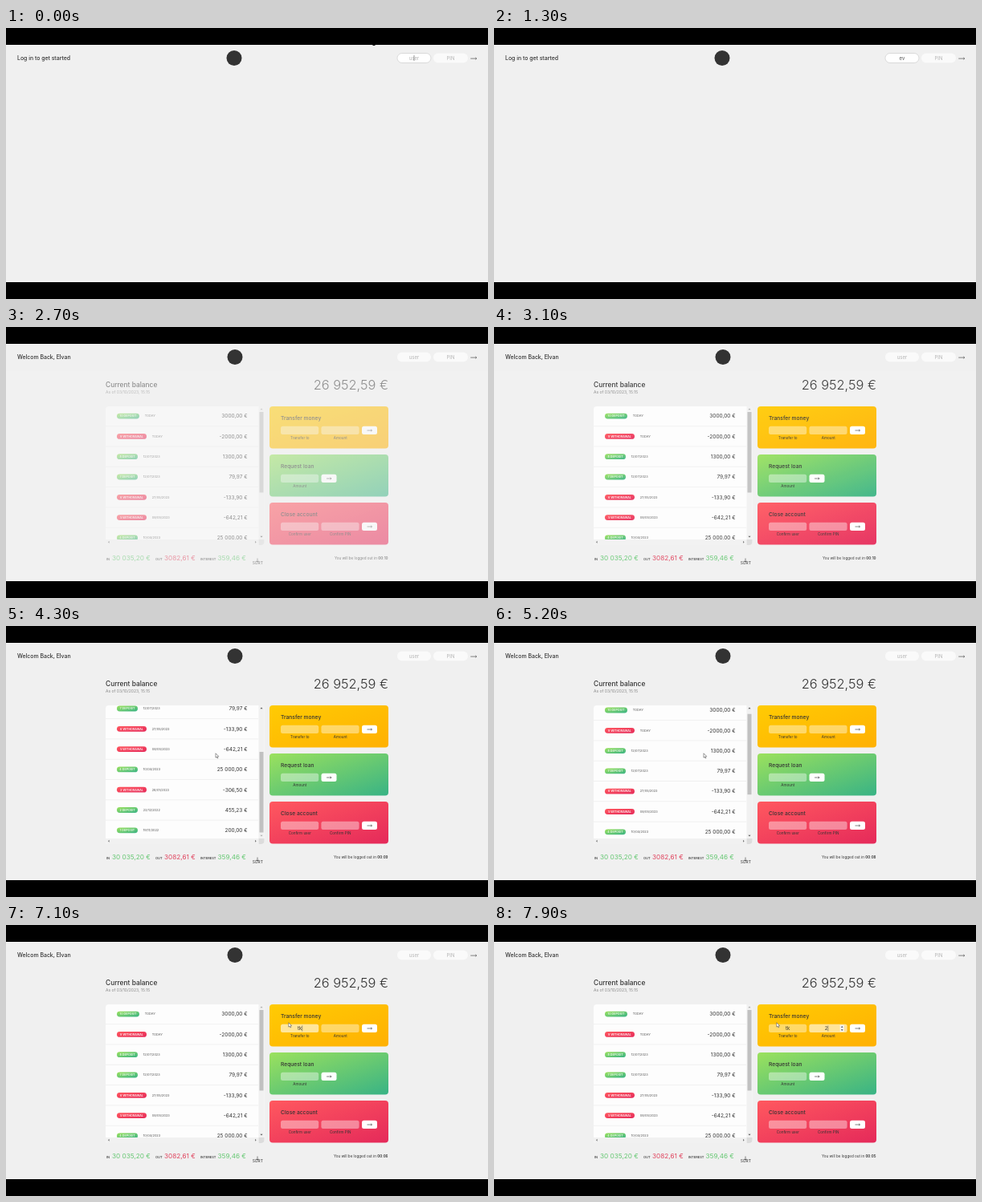
Animation, 600 px wide and 338 px high, one loop 8000 ms. Source, as an HTML page with a canvas:

```html
<!DOCTYPE html>
<html lang="en">
<head>
<meta charset="utf-8">
<title>Banking dashboard</title>
<style>
html, body { margin: 0; width: 100%; height: 100%; overflow: hidden; background: #000; }
canvas { display: block; }
</style>
</head>
<body>
<canvas id="stage" width="600" height="338"></canvas>
<script>
const ctx = document.getElementById('stage').getContext('2d');
const LOOP = 8000, LOGIN = 2400, TIMER_START = 3600;
const PAGE = '#f0f0f0', INK = '#333', MUTED = '#888';
const GREEN = ['#9be15d', '#39b385'], RED = ['#ff585f', '#e52a5a'], YELLOW = ['#ffcb03', '#ffb003'];
const ROW_HEIGHT = 25.3, MAX_SCROLL = 84;

const movements = [
  ['TODAY', '3000,00'], ['TODAY', '-2000,00'], ['12/07/2023', '1300,00'],
  ['12/07/2023', '79,97'], ['27/05/2023', '-133,90'], ['08/05/2023', '-642,21'],
  ['10/04/2023', '25 000,00'], ['28/01/2023', '-306,50'], ['23/12/2022', '455,23'],
  ['19/11/2022', '200,00']
];

const clamp = v => Math.max(0, Math.min(1, v));
const ramp = (t, start, end) => clamp((t - start) / (end - start));
const smooth = p => p * p * (3 - 2 * p);
const mix = (a, b, p) => a + (b - a) * p;

// Text typed so far, given the time of each key press.
const typed = (t, text, times) => text.slice(0, times.filter(k => t >= k).length);

// CSS "ease": cubic-bezier(.25, .1, .25, 1)
function ease(x) {
  const bezier = (u, a, b) => 3 * u * (1 - u) ** 2 * a + 3 * u * u * (1 - u) * b + u ** 3;
  let low = 0, high = 1;
  for (let i = 0; i < 20; i++) {
    const mid = (low + high) / 2;
    if (bezier(mid, .25, .25) < x) low = mid; else high = mid;
  }
  return bezier(low, .1, 1);
}

function text(str, x, y, size, { color = INK, weight = 400, align = 'left' } = {}) {
  ctx.font = `${weight} ${size}px Inter, "Open Sans", sans-serif`;
  ctx.fillStyle = color;
  ctx.textAlign = align;
  ctx.fillText(str, x, y);
  return ctx.measureText(str).width;
}

function box(x, y, w, h, radius, fill, stroke) {
  ctx.beginPath();
  ctx.roundRect(x, y, w, h, radius);
  ctx.fillStyle = fill;
  ctx.fill();
  if (stroke) {
    ctx.strokeStyle = stroke;
    ctx.lineWidth = .8;
    ctx.stroke();
  }
}

// Diagonal gradient running to the top left corner of a box.
function diagonal(x, y, w, h, [light, dark]) {
  const k = w * h / (w * w + h * h), cx = x + w / 2, cy = y + h / 2;
  const g = ctx.createLinearGradient(cx - h * k, cy - w * k, cx + h * k, cy + w * k);
  g.addColorStop(0, light);
  g.addColorStop(1, dark);
  return g;
}

function line(points, color, width = .7) {
  ctx.beginPath();
  points.forEach(([x, y]) => ctx.lineTo(x, y));
  ctx.strokeStyle = color;
  ctx.lineWidth = width;
  ctx.stroke();
}

function polygon(points, fill) {
  ctx.beginPath();
  points.forEach(([x, y]) => ctx.lineTo(x, y));
  ctx.closePath();
  ctx.fillStyle = fill;
  ctx.fill();
}

function arrow(cx, cy, length) {
  const tip = cx + length / 2;
  line([[cx - length / 2, cy], [tip, cy]], INK, .6);
  line([[tip - 1.4, cy - 1.2], [tip, cy], [tip - 1.4, cy + 1.2]], INK, .6);
}

const caret = (x, y) => line([[x, y - 3.5], [x, y + 3.5]], '#555', .6);

function pointer(x, y) {
  const shape = [[0, 0], [0, 5.4], [1.2, 4.3], [2.1, 6.2], [3, 5.8], [2.2, 4], [3.8, 3.8], [0, 0]]
    .map(([dx, dy]) => [x + dx, y + dy]);
  polygon(shape, '#fff');
  line(shape, '#555', .6);
}

function header(t) {
  const loggedIn = t >= LOGIN;
  text(loggedIn ? 'Welcom Back, Elvan' : 'Log in to get started', 14, 40, 6.9, { weight: 500 });

  ctx.beginPath();
  ctx.arc(loggedIn ? 285 : 284, 37.5, 9.5, 0, 2 * Math.PI);
  ctx.fillStyle = INK;
  ctx.fill();

  const user = loggedIn ? '' : typed(t, 'ev', [500, 800]);
  const pin = loggedIn ? '' : typed(t, '1111', [1500, 1600, 1700, 1900]);
  box(487, 31.5, 42, 12, 6, loggedIn ? '#fafafa' : '#fff', loggedIn ? null : '#d2d2d2');
  box(532, 31.5, 43, 12, 6, '#fafafa');
  const field = (value, hint, x) =>
    text(value || hint, x, 39.7, 6, { color: value ? '#555' : '#b5b5b5', align: 'center' });
  const userWidth = field(user, 'user', 508);
  field(pin, 'PIN', 553.5);
  if (t < 500) caret(508, 37.5);
  else if (t < 1300) caret(508.5 + userWidth / 2, 37.5);
  arrow(582, 38.1, 7.5);
  if (t < 100) box(456.5, 21, 3, 1, 0, '#111');
}

function movementList(scroll) {
  box(124, 99, 197.5, 173, 4, '#fdfdfd');
  ctx.save();
  ctx.beginPath();
  ctx.rect(124, 99, 190.5, 166);
  ctx.clip();
  movements.forEach(([date, amount], i) => {
    const y = 111 + i * ROW_HEIGHT - scroll;
    const out = amount[0] === '-', number = movements.length - i;
    const width = out ? 37 : number > 9 ? 28 : 26;
    box(138, y - 3.3, width, 6.8, 3.4, diagonal(138, y - 3.3, width, 6.8, out ? RED : GREEN));
    text(`${number} ${out ? 'WITHDRAWAL' : 'DEPOSIT'}`, 138 + width / 2, y + 1.4, 3.7,
      { color: '#fff', weight: 500, align: 'center' });
    text(date, 138 + width + 6.7, y + 1.4, 3.9, { color: '#555' });
    text(amount + ' €', 300.5, y + 2.4, 6.5, { align: 'right' });
    line([[124, y + 12.7], [314.5, y + 12.7]], '#eee', .8);
  });
  ctx.restore();

  box(314.5, 99, 7, 166, [0, 4, 0, 0], '#f1f1f1');
  box(124, 265, 190.5, 7, [0, 0, 0, 4], '#f1f1f1');
  box(314.5, 265, 7, 7, [0, 0, 4, 0], '#dcdcdc');
  box(315.5, 106 + 51 * scroll / MAX_SCROLL, 5, 100.5, 0, '#c1c1c1');
  const up = scroll > 0 ? '#555' : '#aaa', down = scroll < MAX_SCROLL ? '#555' : '#aaa';
  polygon([[316.5, 103.3], [318, 101.5], [319.5, 103.3]], up);
  polygon([[316.5, 260.7], [318, 262.5], [319.5, 260.7]], down);
  polygon([[128.6, 266.7], [126.9, 268.2], [128.6, 269.7]], '#777');
  polygon([[310, 266.7], [311.7, 268.2], [310, 269.7]], '#777');
}

function card(y, title, colors, labels) {
  box(328, y, 148, 52.4, 4, diagonal(328, y, 148, 52.4, colors));
  text(title, 342, y + 17.1, 6.7, { weight: 500 });
  labels.forEach((label, i) => {
    box(342 + i * 50.4, y + 24.8, 47.2, 10.2, 2.5, 'rgba(255,255,255,.4)');
    text(label, 365.8 + i * 50.4, y + 41.4, 4.6, { align: 'center' });
  });
  const x = 342 + labels.length * 50.5;
  box(x, y + 24.8, 19, 10.2, 2.5, '#fff');
  arrow(x + 9.5, y + 30, 6);
}

function transferInputs(t) {
  const recipient = typed(t, 'tk', [6800, 7000]);
  const amount = typed(t, '2', [7700]);
  const inAmount = t >= 7400;
  const focus = .33 * (inAmount ? 1 : ramp(t, 6150, 6350));
  box(inAmount ? 392.4 : 342, 123.8, 47.2, 10.2, 2.5, `rgba(255,255,255,${focus})`);
  const recipientWidth = text(recipient, 365.6, 131.2, 6, { align: 'center' });
  const amountWidth = text(amount, 413.5, 131.2, 6, { align: 'center' });
  if (inAmount) {
    caret(414 + amountWidth / 2, 129);
    box(430.7, 124.8, 5, 8.3, .5, '#f4f4f4');
    polygon([[431.9, 127.8], [433.2, 126], [434.5, 127.8]], '#444');
    polygon([[431.9, 130.2], [433.2, 132], [434.5, 130.2]], '#444');
  } else if (t >= 6500) caret(366.1 + recipientWidth / 2, 129);
}

function summary(t) {
  const items = [
    [125, 'IN', 132, '30 035,20 €', '#66c873'],
    [186, 'OUT', 197, '3082,61 €', '#e0455f'],
    [242, 'INTEREST', 263.5, '359,46 €', '#66c873']
  ];
  for (const [x, label, valueX, value, color] of items) {
    text(label, x, 291, 4, { weight: 500 });
    text(value, valueX, 291, 8.2, { color });
  }
  line([[313, 288.5], [313, 293]], INK, .6);
  line([[311.8, 291.8], [313, 293], [314.2, 291.8]], INK, .6);
  text('SORT', 313.3, 296.2, 4.9, { align: 'center' });

  const seconds = 10 - (t < TIMER_START ? 0 : 1 + Math.floor((t - TIMER_START) / 1000));
  const clock = '00:' + String(seconds).padStart(2, '0');
  const width = text(clock, 475.5, 290.4, 4.5, { weight: 600, align: 'right' });
  text('You will be logged out in', 474.2 - width, 290.4, 4.6, { align: 'right' });
}

function dashboard(t) {
  const scroll = MAX_SCROLL * (smooth(ramp(t, 3500, 4100)) - smooth(ramp(t, 4700, 5300)));
  text('Current balance', 124, 74.7, 8.4, { weight: 500 });
  text('As of 03/10/2023, 15:15', 124, 82.7, 5, { color: MUTED });
  text('26 952,59 €', 476, 78.4, 16.4, { weight: 300, align: 'right' });
  movementList(scroll);
  card(99, 'Transfer money', YELLOW, ['Transfer to', 'Amount']);
  card(159, 'Request loan', GREEN, ['Amount']);
  card(219, 'Close account', RED, ['Confirm user', 'Confirm PIN']);
  transferInputs(t);
  summary(t);

  // The page colour on top makes the whole dashboard fade as one layer.
  ctx.globalAlpha = 1 - ease(ramp(t, LOGIN, LOGIN + 1000));
  box(0, 55, 600, 262, 0, PAGE);
  ctx.globalAlpha = 1;

  if (t >= 3200) {
    const enter = smooth(ramp(t, 3200, 3600)), move = smooth(ramp(t, 5400, 6150));
    pointer(mix(mix(470, 261, enter), 351.8, move), mix(mix(24, 158.8, enter), 121.8, move));
  }
}

function draw(now) {
  const t = now % LOOP;
  box(0, 0, 600, 338, 0, '#000');
  box(0, 21, 600, 296, 0, PAGE);
  header(t);
  if (t >= LOGIN) dashboard(t);
  requestAnimationFrame(draw);
}
requestAnimationFrame(draw);
</script>
</body>
</html>
```
